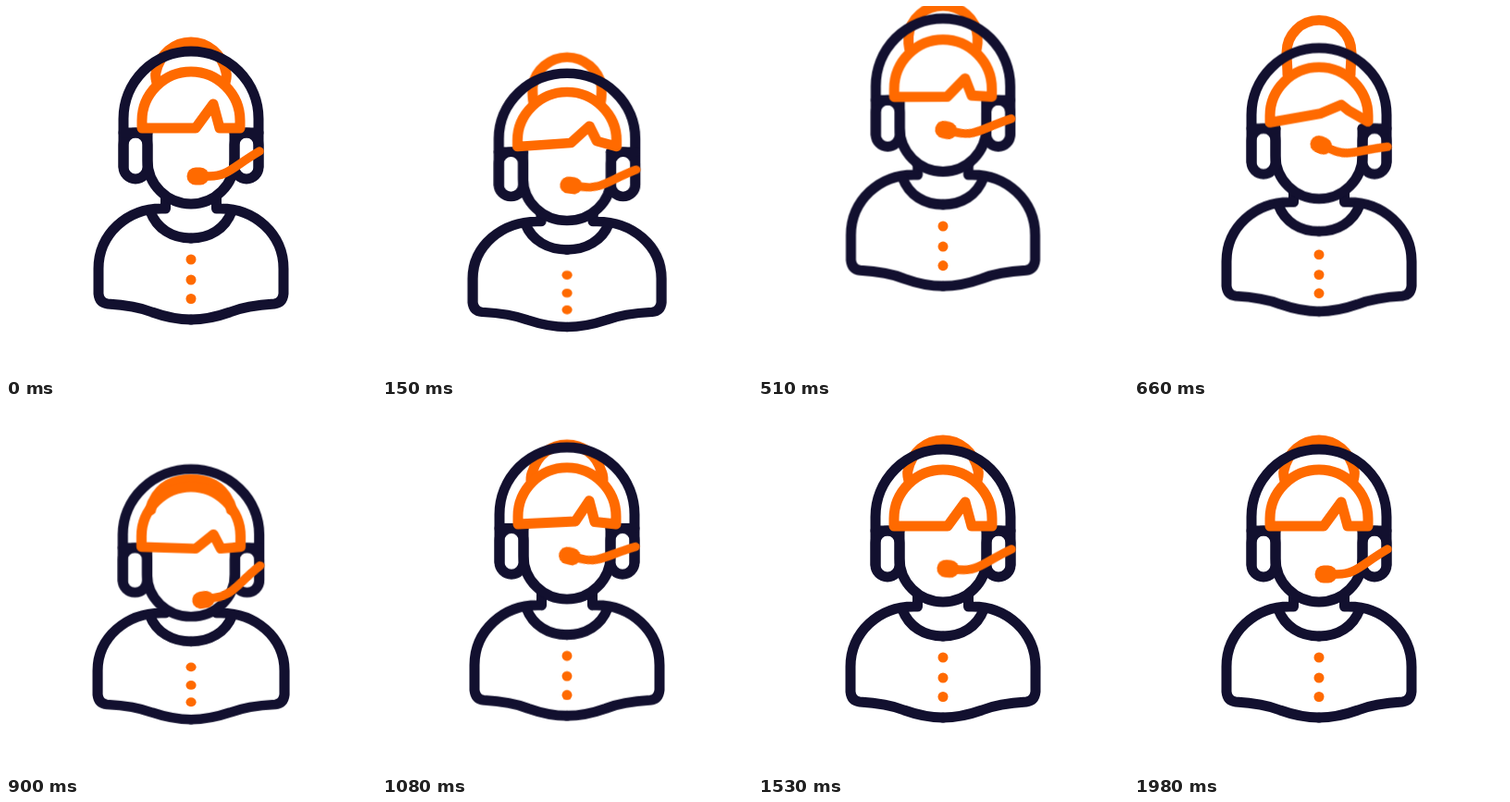
These frames come from a looping animation (400 px wide and 400 px high, 2040 ms). An HTML page without scripts:

```html
<!DOCTYPE html>
<html lang="en">
<head>
<meta charset="utf-8">
<title>Support agent</title>
<style>
  html, body { margin: 0; width: 100%; height: 100%; overflow: hidden; background: #fff; }
  svg { display: block; width: 100vw; height: 100vh; }
  path, rect { stroke-linecap: round; stroke-linejoin: round; stroke-width: 11; fill: none; }
  .navy { stroke: #12102f; }
  .orange { stroke: #ff6a00; }
  .fill { fill: #ff6a00; }

  .head, .body, .dots, .bun, .fringe, .mic { animation: 2040ms ease-in-out infinite; }
  .head { transform-origin: 200px 214px; animation-name: head; }
  .body { transform-origin: 200px 339px; animation-name: body; }
  .dots { transform-origin: 200px 316px; animation-name: dots; }
  .mic { transform-origin: 274px 157px; animation-name: mic; }
  .bun { animation-name: bun; }
  .fringe { animation-name: fringe; }

  /* crouch, leap, land, settle */
  @keyframes head {
    0%, 62%, 100% { transform: translateY(0) scale(1, 1); }
    7.35% { transform: translateY(18px) scale(1.01, .965); animation-timing-function: ease-in; }
    14.71% { transform: translateY(-21px) scale(1, .982); animation-timing-function: ease-out; }
    22.06% { transform: translateY(-39px) scale(.995, 1.005); animation-timing-function: ease-in; }
    32.35% { transform: translateY(-6px) scale(1, .988); animation-timing-function: ease-out; }
    38.73% { transform: translateY(25px) scale(1.015, .955); animation-timing-function: ease-in; }
    44.12% { transform: translateY(16px) scale(1.01, .966); animation-timing-function: ease-out; }
    52.94% { transform: translateY(-3px) scale(1, .995); }
  }
  @keyframes body {
    0%, 62%, 100% { transform: translateY(0) scale(1, 1); }
    7.35% { transform: translateY(8px) scale(1.02, .95); animation-timing-function: ease-in; }
    14.71% { transform: translateY(-23px) scale(1, .983); animation-timing-function: ease-out; }
    22.06% { transform: translateY(-40px) scale(.995, 1.005); animation-timing-function: ease-in; }
    32.35% { transform: translateY(-9px) scale(1, .985); animation-timing-function: ease-out; }
    38.73% { transform: translateY(8px) scale(1.028, .93); animation-timing-function: ease-in; }
    44.12% { transform: translateY(2px) scale(1.01, .958); animation-timing-function: ease-out; }
    52.94% { transform: translateY(-2px) scale(1, .995); }
  }
  @keyframes dots {
    0%, 14.71%, 22.06%, 52.94%, 100% { transform: translateY(0) scaleY(1); }
    7.35%, 44.12% { transform: translateY(3px) scaleY(.93); }
    32.35% { transform: translateY(2.5px) scaleY(1); }
    38.73% { transform: translateY(4px) scaleY(.92); }
  }
  @keyframes mic {
    0%, 97.06%, 100% { transform: rotate(0deg); }
    7.35% { transform: rotate(8deg); }
    14.71% { transform: rotate(-12deg); }
    26.47% { transform: rotate(13deg); }
    32.35% { transform: rotate(23.5deg); }
    38.73% { transform: rotate(11deg); }
    44.12% { transform: rotate(-10deg); }
    52.94% { transform: rotate(14deg); }
    63% { transform: rotate(-4deg); }
    75% { transform: rotate(5deg); }
    85.3% { transform: rotate(-2.5deg); }
  }
  @keyframes bun {
    0%, 75%, 100% { d: path("M163 83C162 79 161 76 162 72C166 52 182 39 200 39C218 39 234 52 238 72C239 76 238 79 237 83"); }
    7.35% { d: path("M164 81C163 76 163 70 163 64C166 45 182 31 200 31C218 31 234 45 237 64C237 70 237 76 236 81"); }
    14.71%, 44.12% { d: path("M157 95C157 91 158 87 160 84C167 68 182 60 200 60C218 60 233 68 240 84C242 87 243 91 243 95"); }
    22.06% { d: path("M161 86C160 82 160 79 161 76C165 58 182 47 200 47C218 47 235 58 239 76C240 79 240 82 239 86"); }
    26.47% { d: path("M164 80C163 75 163 70 163 66C164 46 181 32 200 32C219 32 236 46 237 66C237 70 237 75 236 80"); }
    32.35% { d: path("M166 78C166 70 165 62 165 54C165 34 181 18.5 200 18.5C219 18.5 235 34 235 54C235 62 234 70 234 78"); }
    38.73% { d: path("M164 80C163 75 163 69 163 63C166 44 182 30 200 30C218 30 234 44 237 63C237 69 237 75 236 80"); }
    52.94% { d: path("M161 85C161 81 161 78 163 75C168 57 183 46 200 46C217 46 232 57 237 75C239 78 239 81 239 85"); }
    62% { d: path("M163 83C162 79 161 76 162 72C166 51 182 38 200 38C218 38 234 51 238 72C239 76 238 79 237 83"); }
  }
  @keyframes fringe {
    0%, 75%, 100% { d: path("M147 132L205 132L224 106L231 132L253 132L253 124C253 95 229 71 200 71C171 71 147 95 147 124Z"); }
    7.35% { d: path("M147 131L204 127L224 108L232 125L253 131L253 124C253 95 229 70 200 70C171 70 147 95 147 124Z"); }
    14.71% { d: path("M147 137L205 141L224 122L232 140L253 137L253 126C253 97 229 73 200 73C171 73 147 97 147 126Z"); }
    22.06% { d: path("M147 134L205 136L224 114L231 135L253 134L253 125C253 96 229 72 200 72C171 72 147 96 147 125Z"); }
    32.35% { d: path("M147 130.5L202 120.5L224 111L232 117.5L253 129.5L253 123C253 94 229 70 200 70C171 70 147 94 147 123Z"); }
    38.73% { d: path("M147 131L203 125L224 112L232 123L253 131L253 123C253 94 229 69 200 69C171 69 147 94 147 123Z"); }
    44.12% { d: path("M147 136L205 138L224 122L232 138L253 136L253 124C253 94 229 69 200 69C171 69 147 94 147 124Z"); }
    52.94% { d: path("M147 132.5L209 129.5L224 107L230 130L253 132.5L253 124C253 95 229 71 200 71C171 71 147 95 147 124Z"); }
  }
</style>
</head>
<body>
<svg viewBox="0 0 400 400">
  <g class="head">
    <path class="bun orange" d="M163 83C162 79 161 76 162 72C166 52 182 39 200 39C218 39 234 52 238 72C239 76 238 79 237 83"/>
  </g>

  <g class="body">
    <g id="half" class="navy">
      <path d="M172.5 206V219C130 217 100 248 100 284V311Q101 321 110 322C128 323 143 325 158 331C172 336 186 339 200 339"/>
      <path d="M156 222C163 241 180 251 200 251"/>
    </g>
    <use href="#half" transform="matrix(-1 0 0 1 400 0)"/>
    <g class="dots fill">
      <circle cx="200" cy="274" r="5.5"/>
      <circle cx="200" cy="296" r="5.5"/>
      <circle cx="200" cy="316.500" r="5.5"/>
    </g>
  </g>

  <g class="head">
    <g class="navy">
      <path d="M153 137V167A47 47 0 0 0 247 167V137" style="fill:#fff"/>
      <path d="M127 174V122A73 73 0 0 1 273 122V174"/>
      <rect x="127" y="137" width="26" height="50" rx="13"/>
      <rect x="247" y="137" width="26" height="50" rx="13"/>
      <path d="M127 137H153M247 137H273"/>
    </g>
    <path class="fringe orange" d="M147 132L205 132L224 106L231 132L253 132L253 124C253 95 229 71 200 71C171 71 147 95 147 124Z"/>
    <g class="mic">
      <path class="orange" style="stroke-width:9.5" d="M207 184H220C240 184 245 174 274 157"/>
      <rect class="fill" x="195.500" y="174.500" width="24" height="19" rx="9.500"/>
    </g>
  </g>
</svg>
</body>
</html>
```
